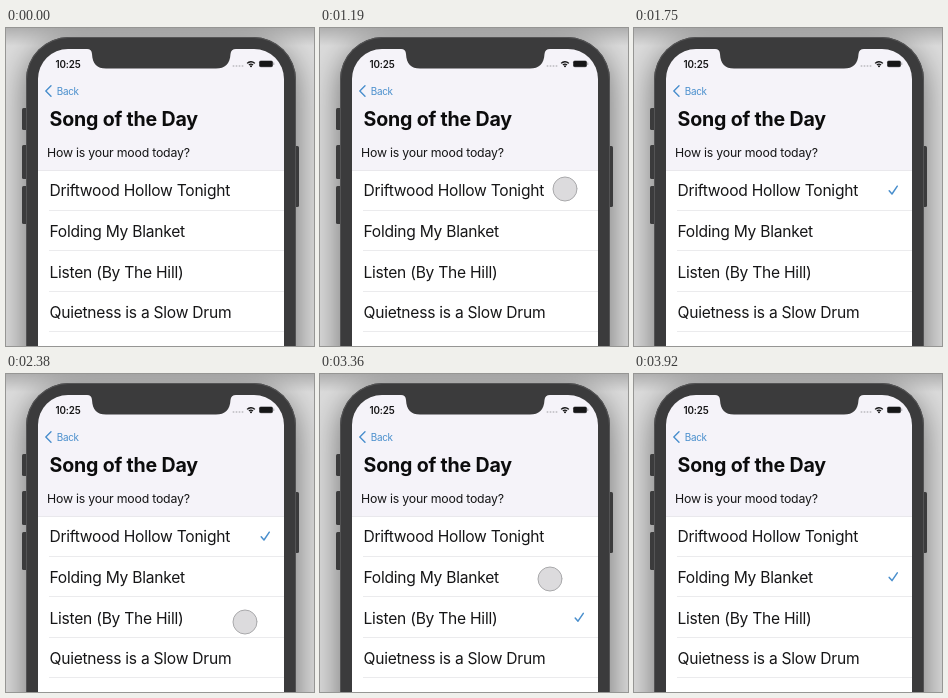
An HTML page with a canvas for the animation above (4.83 s loop, 308 by 318 pixels).

```html
<!DOCTYPE html>
<html lang="en">
<head>
<meta charset="utf-8">
<title>Song of the Day</title>
<style>
  html, body { margin: 0; width: 100%; height: 100%; overflow: hidden; background: #dcdcdc; }
  canvas { display: block; width: 308px; height: 318px; }
</style>
</head>
<body>
<canvas id="stage"></canvas>
<script>
const W = 308, H = 318, LOOP = 4830, STEP = 70;
const FONT = 'Inter, Roboto, sans-serif';
const BLUE = '#4a8fcd', BODY = '#3b3b3c', INK = '#161617';
const SONGS = [
  'Driftwood Hollow Tonight',
  'Folding My Blanket',
  'Listen (By The Hill)',
  'Quietness is a Slow Drum'
];
const SCREEN = { x: 32, y: 21, w: 246, r: 30 };
const LIST_TOP = 142, ROW = 40.6;

// Each tap: touch point, time range, fade-in length, and check-mark times.
const TAPS = [
  { row: 0, x: 245, y: 161, on: 1190, off: 1260, fade: 0, check: 1400, checkFade: 280 },
  { row: 2, x: 239, y: 248, on: 2310, off: 2520, fade: 140, check: 2590, checkFade: 140, lit: [2520, 2870, 2940] },
  { row: 1, x: 230, y: 205, on: 3360, off: 3500, fade: 0, check: 3500, checkFade: 140, lit: [3500, 3570, 3570] }
];

const canvas = document.getElementById('stage');
const ctx = canvas.getContext('2d');
const dpr = window.devicePixelRatio || 1;
canvas.width = W * dpr;
canvas.height = H * dpr;

const clamp = v => Math.max(0, Math.min(1, v));

function box(x, y, w, h, r, color) {
  ctx.fillStyle = color;
  ctx.beginPath();
  ctx.roundRect(x, y, w, h, r);
  ctx.fill();
}

function rect(x, y, w, h, color) {
  ctx.fillStyle = color;
  ctx.fillRect(x, y, w, h);
}

function text(str, x, y, size, weight, color, spacing = 0) {
  ctx.font = `${weight} ${size}px ${FONT}`;
  ctx.letterSpacing = spacing + 'px';
  ctx.fillStyle = color;
  ctx.fillText(str, x, y);
}

function line(points, color, width) {
  ctx.strokeStyle = color;
  ctx.lineWidth = width;
  ctx.lineCap = ctx.lineJoin = 'round';
  ctx.beginPath();
  points.forEach(([x, y]) => ctx.lineTo(x, y));
  ctx.stroke();
}

function drawPhone() {
  rect(0, 0, W, H, '#dcdcdc');
  const shade = ctx.createLinearGradient(0, 0, 0, 18);
  shade.addColorStop(0, 'rgba(0,0,0,.2)');
  shade.addColorStop(1, 'rgba(0,0,0,0)');
  rect(0, 0, W, 18, shade);
  ctx.save();
  ctx.shadowColor = 'rgba(0,0,0,.5)';
  ctx.shadowBlur = 32 * dpr;
  ctx.shadowOffsetY = 8 * dpr;
  box(20, 9, 270, 400, 43, BODY);
  ctx.restore();
  for (const [y, h] of [[80, 22], [117, 34], [158, 38]]) box(16, y, 6, h, 1.5, BODY);
  box(287, 118, 6, 61, 1.5, BODY);
  box(20, 9, 270, 400, 43, '#545455');
  box(21, 10, 268, 400, 42, BODY);
}

function drawNotch() {
  ctx.fillStyle = BODY;
  ctx.beginPath();
  ctx.moveTo(81, 20);
  ctx.lineTo(81, 21);
  ctx.quadraticCurveTo(85.7, 21, 86, 26);
  ctx.bezierCurveTo(86.5, 36, 91, 40.5, 100, 40.5);
  ctx.lineTo(210, 40.5);
  ctx.bezierCurveTo(219, 40.5, 224, 36, 224.5, 26);
  ctx.quadraticCurveTo(225, 21, 230, 21);
  ctx.lineTo(230, 20);
  ctx.fill();
}

function drawStatus() {
  text('10:25', 49.5, 39.5, 9.8, 600, INK, -0.15);
  for (let i = 0; i < 4; i++) box(226.5 + i * 3, 37, 2, 2, 1, '#c6c5ca');
  ctx.strokeStyle = INK;
  ctx.lineCap = 'butt';
  ctx.lineWidth = 1.4;
  for (const r of [2.8, 5.3]) {
    ctx.beginPath();
    ctx.arc(245, 39, r, -Math.PI * 0.76, -Math.PI * 0.24);
    ctx.stroke();
  }
  box(244, 37.2, 2, 2, 1, INK);
  box(253, 32.5, 14, 6.8, 1.8, '#77767a');
  box(253.5, 33, 13, 5.8, 1.3, INK);
  rect(267.4, 34.6, 0.8, 2.4, '#929196');
}

function drawHeader() {
  rect(SCREEN.x, SCREEN.y, SCREEN.w, LIST_TOP - SCREEN.y, '#f5f3f9');
  drawStatus();
  line([[45, 57.8], [39.8, 63], [45, 68.2]], BLUE, 1.4);
  text('Back', 50.7, 66.6, 9.9, 400, BLUE, -0.25);
  text('Song of the Day', 43.6, 97.5, 19.6, 700, '#0c0c0d', -0.2);
  text('How is your mood today?', 41, 129, 12.3, 400, INK, -0.2);
  rect(SCREEN.x, LIST_TOP, SCREEN.w, 1, '#e9e8ec');
}

function highlight(tap, t) {
  if (!tap.lit) return 0;
  const [on, fade, off] = tap.lit;
  if (t < on || t >= off) return 0;
  return t < fade ? 1 : 0.5;
}

// Opacity of the check mark of one tap; the next tap takes it away.
function checkAlpha(i, t) {
  const tap = TAPS[i], next = TAPS[i + 1];
  if (t < tap.check || (next && t >= next.check)) return 0;
  return clamp((t - tap.check + STEP) / tap.checkFade);
}

function drawList(t) {
  rect(SCREEN.x, LIST_TOP + 1, SCREEN.w, H, '#fff');
  SONGS.forEach((song, i) => {
    rect(43, Math.round(LIST_TOP + ROW * (i + 1)) - 1, 235, 1, '#ebebed');
  });
  TAPS.forEach((tap, i) => {
    const top = LIST_TOP + tap.row * ROW;
    ctx.globalAlpha = highlight(tap, t);
    rect(SCREEN.x, Math.round(top), SCREEN.w, 41, '#e7e5ea');
    ctx.globalAlpha = checkAlpha(i, t);
    const c = top + 20;
    line([[255.2, c + 0.8], [258, c + 4], [263.3, c - 3.8]], BLUE, 1.5);
    ctx.globalAlpha = 1;
  });
  SONGS.forEach((song, i) => text(song, 43.5, 168.3 + i * ROW, 15.6, 400, INK, -0.25));
}

function drawTouch(t) {
  for (const tap of TAPS) {
    if (t < tap.on || t >= tap.off) continue;
    ctx.globalAlpha = tap.fade ? clamp((t - tap.on + STEP) / tap.fade) : 1;
    ctx.beginPath();
    ctx.arc(tap.x, tap.y, 12, 0, Math.PI * 2);
    ctx.fillStyle = '#dcdbdd';
    ctx.fill();
    ctx.strokeStyle = '#a9a9ab';
    ctx.lineWidth = 1;
    ctx.stroke();
    ctx.globalAlpha = 1;
  }
}

function draw(now) {
  const t = Math.floor((now % LOOP) / STEP) * STEP;
  ctx.setTransform(dpr, 0, 0, dpr, 0, 0);
  drawPhone();
  ctx.save();
  ctx.beginPath();
  ctx.roundRect(SCREEN.x, SCREEN.y, SCREEN.w, 400, SCREEN.r);
  ctx.clip();
  drawHeader();
  drawList(t);
  drawTouch(t);
  ctx.restore();
  drawNotch();
}

const start = performance.now();
function tick() {
  draw(performance.now() - start);
  requestAnimationFrame(tick);
}
tick();
</script>
</body>
</html>
```
